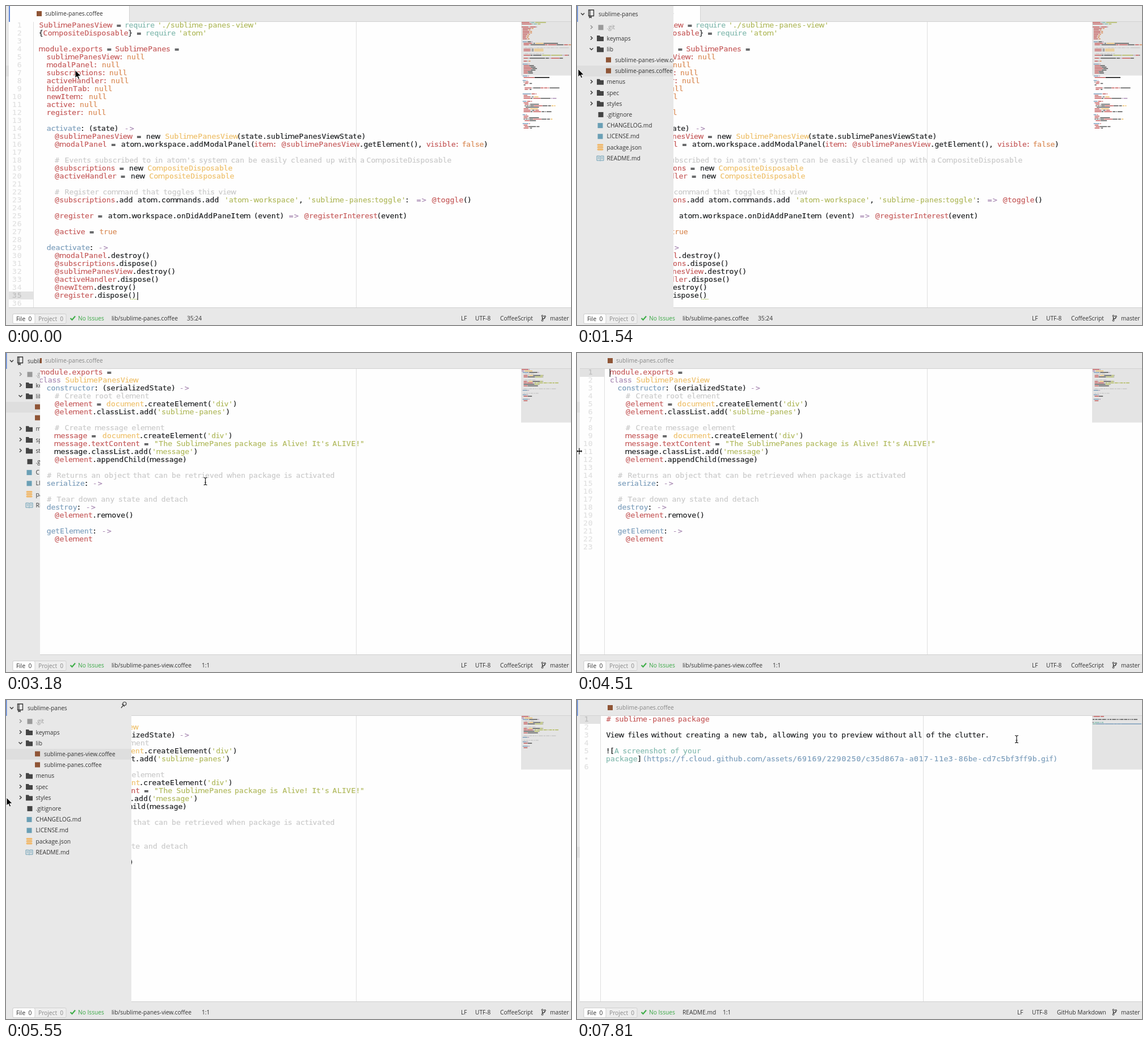
An HTML page for the animation above (8000 ms loop, 996x562 px).

```html
<!DOCTYPE html>
<html lang="en">
<head>
<meta charset="utf-8">
<title>Editor with sliding file tree</title>
<style>
  html, body { margin: 0; width: 100%; height: 100%; overflow: hidden; background: #e8e8e8; }
  svg { display: block; width: 100%; height: 100%; }
  .ui { font: 10.2px "Open Sans", "Noto Sans", sans-serif; fill: #333; }
  .code { font: 13px "DejaVu Sans Mono", monospace; text-anchor: middle; white-space: pre; stroke-width: .2px; }
  .wide { font-family: "DejaVu Sans", sans-serif; }
</style>
</head>
<body>
<svg id="stage" viewBox="0 0 996 562" xmlns="http://www.w3.org/2000/svg"></svg>
<script>
const LOOP = 8000, STEP = 150, LINE = 14, OPEN = 221, CLOSED = 5;

const colours = {
  k: '#1d1f21', r: '#c55a5a', o: '#d98a55', y: '#eebf68', g: '#b0b95c',
  t: '#82b9ae', b: '#7b9dbb', p: '#a98ab3', c: '#c9c9c9'
};

// Each token is: optional x position, colour key, text.
const mainCode = [
  "rSublimePanesView|k = |209trequire |267g'./sublime-panes-view'",
  "k{|rCompositeDisposable|k} = |246trequire |304g'atom'",
  "",
  "rmodule.exports|k = |192rSublimePanes|k =",
  "r  sublimePanesView: |213onull",
  "r  modalPanel: |169onull",
  "r  subscriptions: |182onull",
  "r  activeHandler: |185onull",
  "r  hiddenTab: |156onull",
  "r  newItem: |146onull",
  "r  active: |130onull",
  "r  register: |145onull",
  "",
  "b  activate|k: |146k(state) |208p->",
  "r    @sublimePanesView|k = |247knew |280ySublimePanesView|407k(state.sublimePanesViewState)",
  "r    @modalPanel|k = |203katom.workspace.addModalPanel(|438ritem: |485r@sublimePanesView|623k.getElement(), |741rvisible: |804ofalse|k)",
  "",
  "c    # |103cEvents subscribed to in atom's system can be easily cleaned up with a |635cCompositeDisposable",
  "r    @subscriptions|k = |217knew |249yCompositeDisposable",
  "r    @activeHandler|k = |220knew |252yCompositeDisposable",
  "",
  "c    # |103cRegister command that toggles this view",
  "r    @subscriptions|k.add |232katom.commands.add |385g'atom-workspace'|k, |531g'sublime-panes:toggle'|k: |723p=> |750r@toggle|k()",
  "",
  "r    @register|k = |180katom.workspace.onDidAddPaneItem |437k(event) |498p=> |525r@registerInterest|654k(event)",
  "",
  "r    @active|k = |165otrue",
  "",
  "b  deactivate|k: |162p->",
  "r    @modalPanel|k.destroy()",
  "r    @subscriptions|k.dispose()",
  "r    @sublimePanesView|k.destroy()",
  "r    @activeHandler|k.dispose()",
  "r    @newItem|k.destroy()",
  "r    @register|k.dispose()",
  ""
];

// Lines below the visible part, seen only in the minimap.
const hiddenCode = [
  "b  serialize: |p->", "r    sublimePanesViewState:| k@sublimePanesView.serialize()", "",
  "b  toggle: |p->", "k    if |r@active", "r      @active = |kfalse", "k    else", "",
  "r      @activeHandler|k = atom.workspace.|ronItem (event) =>|k @registerNext(event)", "r      @active = |ktrue", "", "",
  "b  registerInterest: |r(event) ->", "r    @newItem", "r    @subscriptions|k = new |yComposite",
  "r    @subscriptions|k.add |ratom.workspace.|konDidDestroyPaneItem |p=> @clear()", "",
  "b  showTab: |r(event) ->", "r    @hiddenTab", "r      @newItem|k = event.item.element",
  "k      for tab in document|r.querySelectorAll|k('.tab-bar .tab')|y when tab", "k        tab.classList.add('hidden')",
  "r    @hiddenTab|k = |ytab.element.item", "r    @activeHandler|k = event |ronChange", "r    @activeHandler|k.add |ritem.onDidChange|k (item) => @showTab()", "",
  "b  clear: |r->", "r    @hiddenTab", "r    @newItem|k = @hiddenTab.classList",
  "k    for tab in document|r.querySelectorAll|k('.tab-bar .tab')|y when", "r      @hiddenTab|k.remove(item)", "",
  "b  destroyItem: |r->", "r    @newItem", "r      @newItem|k.destroy(event, @item)", "r    @hiddenTab = |knull"
];

const viewCode = [
  "rmodule.exports|k =",
  "pclass |104ySublimePanesView",
  "b  constructor|k: |170k(serializedState) |305p->",
  "c    # |103cCreate root element",
  "r    @element|k = |177ydocument|243k.createElement(|g'div'|k)",
  "r    @element|k.classList.add(|g'sublime-panes'|k)",
  "",
  "c    # |103cCreate message element",
  "r    message|k = |170ydocument|235k.createElement(|g'div'|k)",
  "r    message|r.textContent|k = |261g\"The |300gSublimePanes |403gpackage is |487gAlive! It's |575gALIVE!\"",
  "k    message.classList.add(|g'message'|k)",
  "r    @element|k.appendChild(message)",
  "",
  "c  # |89cReturns an object |224cthat can be retrieved when |428cpackage is activated",
  "b  serialize|k: |152p->",
  "",
  "c  # |89cTear down any state and detach",
  "b  destroy|k: |140p->",
  "r    @element|k.remove()",
  "",
  "b  getElement|k: |168p->",
  "r    @element",
  ""
];

const readmeCode = [
  "r# |67rsublime-panes |178rpackage",
  "",
  "kView files |131kwithout creating a |274knew tab, |345kallowing you |444kto preview without |585kall of |636kthe clutter.",
  "",
  "k![|tA screenshot of your",
  "tpackage|k]|116b(https://f.cloud.|246bgithub.com/assets/|388b69169/|440b2290250/|509bc35d867a-a017-11e3-86be-cd7c5bf3ff9b.gif)",
  ""
];

const docs = [
  { code: mainCode, rest: hiddenCode, left: 58, gutter: 48, guide: 617, row: 34, caret: 232, phase: 0,
    path: 'lib/sublime-panes.coffee', pos: '35:24', posX: 319, right: [802, 827, 871], grammar: 'CoffeeScript', tab: true },
  { code: viewCode, left: 58, gutter: 48, guide: 617, row: 0, caret: 58, phase: 670,
    path: 'lib/sublime-panes-view.coffee', pos: '1:1', posX: 345, right: [802, 827, 871], grammar: 'CoffeeScript' },
  { code: readmeCode, left: 51, gutter: 41, guide: 610, row: 0, numbers: [1, 2, 3, 4, 5, '•', 6],
    path: 'README.md', pos: '1:1', posX: 257, right: [776, 802, 846], grammar: 'GitHub Markdown' }
];

const advances = [['mM', 11.4], ['w', 9], ['@#=>-', 9.3], ['0123456789', 8.7], ['ABCDEGLPRSTV', 8.5],
  ["evclI'\"", 7.8], ['sr', 7.5], ['t.,!', 7.3], ['jf(){}[]', 7.2], [' ', 6.8], ['i', 6.4], [':;', 5.5]];
const advance = ch => (advances.find(([set]) => set.includes(ch)) || [0, 8])[1];
const parse = line => line ? line.split('|').map(s => s.match(/^(\d*)(.)(.*)$/)) : [];

const rect = (x, y, w, h, fill, extra = '') =>
  `<rect x="${x}" y="${y}" width="${w}" height="${h}" fill="${fill}" ${extra}/>`;
const label = (x, y, text, fill = '#333') => `<text class="ui" x="${x}" y="${y}" style="fill:${fill}">${text}</text>`;
const path = (d, fill, stroke = 'none', extra = '') => `<path d="${d}" fill="${fill}" stroke="${stroke}" ${extra}/>`;

function glyphs(text, pen, y, fill) {
  const runs = text.match(/[mwM]|[^mwM]+/g) || [];
  const spans = runs.map(run => {
    const xs = [...run].map(ch => {
      const w = advance(ch);
      pen += w;
      return (pen - w / 2).toFixed(1);
    });
    return `<tspan x="${xs.join(' ')}"${/[mwM]/.test(run) ? ' class="wide"' : ''}>${run.replace(/>/g, '&gt;')}</tspan>`;
  });
  return { pen, svg: `<text class="code" xml:space="preserve" y="${y}" fill="${fill}" stroke="${fill}">${spans.join('')}</text>` };
}

function codeLine(line, row, left) {
  let pen = left, svg = '';
  for (const [, x, key, text] of parse(line)) {
    const run = glyphs(text, x ? +x : pen, 38 + row * LINE, colours[key]);
    pen = run.pen;
    svg += run.svg;
  }
  return svg;
}

function miniLine(line, row) {
  let column = 0, svg = '';
  for (const [, , key, text] of parse(line)) {
    for (const word of text.matchAll(/\S+/g))
      svg += rect(909 + (column + word.index) * .88, 28.3 + row * 2.62, word[0].length * .88 - .3, 1.5,
        key === 'k' ? '#555' : colours[key]);
    column += text.length;
  }
  return svg;
}

const cup = (x, y) => rect(x, y, 9, 9, '#8f5536');

function drawDoc(doc, i) {
  const { code, left, gutter, row, right } = doc;
  const numbers = doc.numbers || code.map((_, n) => n + 1);
  const gutterText = numbers.map((n, r) =>
    glyphs(String(n), gutter - 20 - 8.7 * String(n).length, 38 + r * LINE, r === row ? '#bdbdbd' : '#e0e0e0').svg);
  const tab = doc.tab ? rect(5, 0, 212, 28, '#fefefe') + rect(5, 0, 2, 28, '#5b83d6') + rect(217, 0, 1, 27, '#d4d4d4') : '';
  return `<g id="doc${i}">` +
    rect(5, 28, 991, 503, '#fefefe') + rect(4, 28, 1, 503, '#dcdcdc') +
    rect(5, 28 + row * LINE - (row ? 1 : 0), gutter - 5, 14, '#e2e2e2') + rect(gutter, 28, 1, 503, '#dfdfdf') +
    gutterText.join('') +
    code.map((line, r) => codeLine(line, r, left)).join('') +
    rect(doc.guide, 28, 1, 503, '#dfdfdf') +
    (doc.tab ? path('M219 516.5H232', 'none', '#a9bd55', 'stroke-dasharray="2 1"') : '') +
    (doc.caret ? rect(doc.caret - .5, 28 + row * LINE, 1.3, 14, '#222', `id="caret${i}"`) : '') +
    rect(908, 28, 88, 94.5, '#e4e4e4') + code.concat(doc.rest || []).map(miniLine).join('') +
    rect(0, 27, 996, 1, '#d2d2d2') + tab + cup(54, 9) + label(69, 17, 'sublime-panes.coffee', doc.tab ? '#333' : '#888') +
    label(186, 553.5, doc.path) + label(doc.posX, 553.5, doc.pos) +
    ['LF', 'UTF-8', doc.grammar].map((s, n) => label(right[n], 553.5, s)).join('') + '</g>';
}

const rowY = i => 37.8 + i * 19.2;
const chevron = (x, y, down) => path(down ? 'M-3-1.5L0 1.5L3-1.5' : 'M-1.5-3L1.5 0L-1.5 3', 'none', '#444',
  `stroke-width="1.6" transform="translate(${x} ${y})"`);

const icons = {
  folder: y => path(`M35 ${y - 5}h5l1 2h6v8h-12z`, '#444'),
  git: (y, tone) => rect(37.5, y - 4.5, 9, 9, tone),
  markdown: y => rect(36.5, y - 4.5, 9, 9, '#6a9fb5'),
  json: y => [-6, -2, 2].map(d => rect(35.5, y + d, 11, 3.4, '#f0bb72', 'rx="1.7"')).join(''),
  book: y => path(`M35 ${y - 4}h5l1 1l1-1h5v8h-5l-1 1l-1-1h-5zM41 ${y - 3}v7M36.5 ${y - 1.5}h3M36.5 ${y + .8}h3M42.5 ${y - 1.5}h3M42.5 ${y + .8}h3`,
    'none', '#6a9fb5'),
  coffee: y => cup(51, y - 5)
};

const tree = [['.git', 'git'], ['keymaps', 'folder'], ['lib', 'folder'], ['sublime-panes-view.coffee', 'coffee'],
  ['sublime-panes.coffee', 'coffee'], ['menus', 'folder'], ['spec', 'folder'], ['styles', 'folder'],
  ['.gitignore', 'git'], ['CHANGELOG.md', 'markdown'], ['LICENSE.md', 'markdown'], ['package.json', 'json'], ['README.md', 'book']];

function drawTree() {
  const rows = tree.map(([name, icon], i) => {
    const y = rowY(i), dim = name === '.git';
    return (icon === 'folder' || dim ? `<g opacity="${dim ? .5 : 1}">${chevron(25.5, y - .5, name === 'lib')}</g>` : '') +
      icons[icon](y, dim ? '#999' : '#444') + label(icon === 'coffee' ? 67 : 52.5, y + 3.5, name, dim ? '#999' : '#333');
  });
  const repo = path('M20.5 7h9v10.5h-9zM22.8 7v10.5M22 17.5v3l1.5-1l1.5 1v-3', 'none', '#333', 'stroke-width="1.3"');
  const pin = '<circle cx="209" cy="6.5" r="3" fill="none" stroke="#444" stroke-width="1.2"/>' +
    path('M204.5 7l4.5 4.5M206.5 9.5l-3.5 4.5', 'none', '#444', 'stroke-width="1.3"');
  return rect(0, 0, OPEN, 532, '#e8e8e8') + rect(0, 0, OPEN, 19.2, '#dedede', 'id="selected"') +
    rect(0, 0, 1.5, 28, '#5b83d6', 'id="focus"') + chevron(10, 14, true) + repo + label(38, 17.5, 'sublime-panes') + pin + rows.join('');
}

const branch = [[945.5, 546], [945.5, 554], [950, 547]].map(([x, y]) =>
  `<circle cx="${x}" cy="${y}" r="1.4" fill="none" stroke="#333"/>`).join('') +
  path('M945.5 547.5v5M950 548.5q0 2.5-4.5 3', 'none', '#333', 'stroke-width="1.3"');
const status = rect(12, 542.5, 94, 17, '#eee', 'stroke="#d0d0d0" rx="2"') + rect(12, 542.5, 39, 17, '#fff', 'stroke="#d0d0d0" rx="2"') +
  label(18, 555, 'File&#160; 0') + label(57, 555, 'Project&#160; 0', '#888') +
  path('M113.5 550l3 3l5.5-6.5', 'none', '#3fae49', 'stroke-width="2.2"') + label(127, 553.5, 'No Issues', '#3aa845') +
  branch + label(959, 553.5, 'master');

const pointers = {
  arrow: path('M0 0V14L3.2 11L5.4 16L7.6 15L5.5 10.3H10Z', '#000', '#fff', 'stroke-width=".9"'),
  resize: path('M-5.5 0L-2.5-3V-1H-1V-6H1V-1H2.5V-3L5.5 0L2.5 3V1H1V6H-1V1H-2.5V3Z', '#000', '#fff', 'stroke-width=".8"'),
  beam: path('M-3-6.5Q0-6.5 0-4.5V4.5Q0 6.5-3 6.5M3-6.5Q0-6.5 0-4.5M0 4.5Q0 6.5 3 6.5M-1.5 2H1.5', 'none', '#222', 'stroke-width="1.2"')
};

const stage = document.getElementById('stage');
stage.innerHTML = `<clipPath id="reveal">${rect(0, 0, CLOSED, 532, '#000', 'id="paneEdge"')}</clipPath>` +
  rect(0, 0, 996, 562, '#e8e8e8') + docs.map(drawDoc).join('') + rect(0, 531, 996, 1, '#cfcfcf') +
  `<g clip-path="url(#reveal)">${drawTree()}</g>` + status +
  '<g id="mouse">' + Object.entries(pointers).map(([id, body]) => `<g id="${id}">${body}</g>`).join('') + '</g>';

const $ = id => document.getElementById(id);
const show = (id, on) => $(id).setAttribute('display', on ? 'inline' : 'none');

// Tables of [step, value...]
const paneSteps = [[0, CLOSED], [9, 80], [10, 170], [11, OPEN], [20, 150], [21, 60], [22, CLOSED],
  [32, 80], [33, 170], [34, OPEN], [47, 150], [48, 60], [49, CLOSED]];
const docSteps = [[0, 0], [18, 1], [40, 2]];
const selectedSteps = [[0, 4], [16, 3], [39, 12]];
const mouseSteps = [[0, 122, 113], [1, 122, 113], [7, 14, 110], [8, 2, 111], [11, 2, 111], [16, 122, 94], [18, 122, 94],
  [22, 428, 270], [23, 428, 270], [25, 80, 213], [26, 80, 213], [30, 4, 173], [32, 4, 173], [36, 2, 172], [37, 1, 172],
  [39, 64, 262], [40, 64, 262], [45, 339, 335], [46, 380, 330], [49, 693, 133], [50, 693, 133], [52, 775, 69], [99, 775, 69]];

const held = (table, step) => table.filter(([s]) => s <= step).pop()[1];
function mouseAt(step) {
  const n = mouseSteps.findIndex(([s]) => s > step);
  const [s0, x0, y0] = mouseSteps[n - 1], [s1, x1, y1] = mouseSteps[n];
  const f = (step - s0) / (s1 - s0);
  return [x0 + (x1 - x0) * f, y0 + (y1 - y0) * f];
}

function render(t) {
  const step = Math.floor((t + 10) / STEP);
  const pane = held(paneSteps, step), current = held(docSteps, step);
  docs.forEach((doc, i) => {
    show('doc' + i, i === current);
    if (doc.caret) show('caret' + i, pane === CLOSED && (t + doc.phase) % 800 < 400);
  });
  $('paneEdge').setAttribute('width', pane);
  $('selected').setAttribute('y', rowY(held(selectedSteps, step)) - 9.6);
  show('focus', pane > CLOSED || current === 2);

  const [x, y] = mouseAt(step);
  const kind = pane === CLOSED && x < 8 ? 'resize' : x > pane && step > 8 ? 'beam' : 'arrow';
  for (const id in pointers) show(id, id === kind);
  $('mouse').setAttribute('transform', `translate(${x} ${y})`);
}

const start = performance.now();
function tick() {
  render((performance.now() - start) % LOOP);
  requestAnimationFrame(tick);
}
tick();
</script>
</body>
</html>
```
